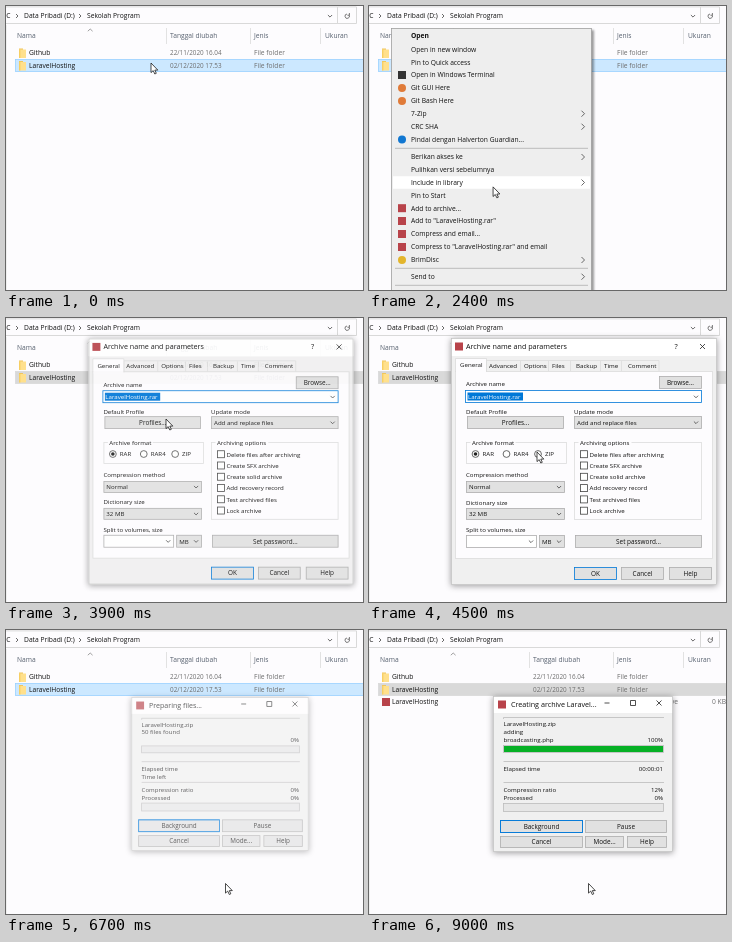
An HTML page for the animation above (9100 ms loop, 357 by 284 pixels).

```html
<!DOCTYPE html>
<html lang="id">
<head>
<meta charset="utf-8">
<title>Membuat arsip</title>
<style>
  html, body { margin: 0; width: 100%; height: 100%; overflow: hidden; background: #fdfcfe; }
  svg { display: block; width: 100%; height: 100%; font: 6.7px "Open Sans", "Noto Sans", sans-serif; }
  text { white-space: pre; }
  .win { filter: drop-shadow(0 1px 3px rgba(0, 0, 0, .38)); }
  .pop { filter: drop-shadow(2px 2px 1.2px rgba(0, 0, 0, .4)); }
  .dlg { font-size: 6.15px; }
</style>
</head>
<body>
<svg id="stage" viewBox="0 0 357 284" preserveAspectRatio="none"></svg>
<script>
const LOOP = 9100, STEP = 100;
const INK = '#111', GREY = '#6d6d6d', EDGE = '#adadad', BLUE = '#0078d7';
const RED = '#b8434a', PAGE = '#fdfcfe';

// Drawing helpers; text is placed by its vertical centre.
const text = (x, y, s, more = '') => `<text x="${x}" y="${y + 2.3}" fill="${INK}" ${more}>${s}</text>`;
const fill = (x, y, w, h, c, more = '') => `<rect x="${x}" y="${y}" width="${w}" height="${h}" fill="${c}" ${more}/>`;
const box = (x, y, x2, y2, c, edge = EDGE, more = '') =>
  `<rect x="${x + .5}" y="${y + .5}" width="${x2 - x - 1}" height="${y2 - y - 1}" fill="${c}" stroke="${edge}" stroke-width=".8" ${more}/>`;
const path = (d, c = '#444', w = .8, more = '') => `<path d="${d}" fill="none" stroke="${c}" stroke-width="${w}" ${more}/>`;
const dot = (x, y, r, c, more = '') => `<circle cx="${x}" cy="${y}" r="${r}" fill="${c}" ${more}/>`;
const square = (x, y, c) => fill(x - 4, y - 4, 8, 8, c);
const right = (x, y, size = 3) => path(`M${x - size / 2} ${y - size}l${size} ${size}l${-size} ${size}`);
const down = (x, y) => path(`M${x - 2.1} ${y - 1}l2.1 2.1l2.1 -2.1`);
const group = (id, body, more = '') => `<g id="${id}" ${more}>${body}</g>`;
const tint = c => `style="fill:${c}"`;
const MID = 'text-anchor="middle"', END = 'text-anchor="end"';
const button = (x, y, x2, y2, s, edge = EDGE) =>
  box(x, y, x2, y2, '#e1e1e1', edge) + text((x + x2) / 2, (y + y2) / 2, s, `${MID} font-size="6.4"`);
const combo = (x, y, x2, y2, s, c = '#e1e1e1', id = '') =>
  box(x, y, x2, y2, c) + text(x + 3, (y + y2) / 2, s, id && `id="${id}"`) + down(x2 - 6, (y + y2) / 2);
const cross = (x, y) => path(`M${x - 2.5} ${y - 2.5}l5 5m0 -5l-5 5`, '#222');

const folder = y => fill(13, y - 4.5, 4, 3, '#efc65c') + fill(13, y - 3.5, 7, 8.5, '#ffe08c') + fill(13, y - 3.5, 1.4, 8.5, '#f7cf63');

function explorer() {
  const date = (y, s) => text(164, y, s, `${tint(GREY)} font-size="6.35"`);
  const kind = y => text(248, y, 'File folder', tint(GREY));
  const heads = [[11, 'Nama'], [164, 'Tanggal diubah'], [248, 'Jenis'], [319, 'Ukuran']];
  return fill(0, 0, 357, 284, PAGE)
    + path('M0 .9H350.5V17.5H0M331.5 1V17.5', '#d9d9d9', 1)
    + text(4.5, 10, 'PC', END) + right(11, 10, 2) + text(18, 10, 'Data Pribadi (D:)')
    + right(74, 10, 2) + text(81, 10, 'Sekolah Program') + down(324, 10)
    + path('M343.2 9.2A2.2 2.2 0 1 1 341 8M343.4 7v2.2h-2', '#444', .7)
    + path('M.5 19V284', '#f0f0f0', 1)
    + path('M160.5 22V38M244.5 22V38M314.5 22V38', '#e2e2e2', 1)
    + path('M81.8 25.2l2.4 -2.2l2.4 2.2', '#777', .7)
    + heads.map(([x, s]) => text(x, 30, s, tint('#56606e'))).join('')
    + box(9, 53, 360, 66, '#cce8ff', '#99d1ff', 'id="row"')
    + folder(47) + text(23, 47, 'Github') + date(47, '22/11/2020 16.04') + kind(47)
    + folder(59.5) + text(23, 59.5, 'LaravelHosting') + date(59.5, '02/12/2020 17.53') + kind(59.5)
    + group('newRow', square(17, 72, RED) + text(23, 72, 'LaravelHosting')
      + text(309, 72, 'ZIP archive', `${END} ${tint(GREY)}`) + text(343, 72, '0 KB', tint(GREY)));
}

// Each entry: centre y, label, icon colour, icon kind ('o' circle, 's' square), submenu
const MENU = [
  [30, 'Open'], [43.5, 'Open in new window'], [56.3, 'Pin to Quick access'],
  [69, 'Open in Windows Terminal', '#333', 's'], [82, 'Git GUI Here', '#e07b39', 'o'],
  [95, 'Git Bash Here', '#e07b39', 'o'], [107.7, '7-Zip', '', '', 1], [120.7, 'CRC SHA', '', '', 1],
  [133.5, 'Pindai dengan Halverton Guardian...', '#1177d1', 'o'],
  [151, 'Berikan akses ke', '', '', 1], [163.7, 'Pulihkan versi sebelumnya'],
  [176.5, 'Include in library', '', '', 1], [189.3, 'Pin to Start'],
  [202.2, 'Add to archive...', RED, 's'], [215, 'Add to "LaravelHosting.rar"', RED, 's'],
  [228, 'Compress and email...', RED, 's'], [241, 'Compress to "LaravelHosting.rar" and email', RED, 's'],
  [254, 'BrimDisc', '#e3b52c', 'o', 1], [270.7, 'Send to', '', '', 1]
];

function entry([y, s, c, kind, more]) {
  const icon = kind === 's' ? square(33, y, c) : kind === 'o' ? dot(33, y, 4, c) : '';
  return icon + text(42, y, s, s === 'Open' ? 'font-weight="700"' : '') + (more ? right(214, y) : '');
}

const menu = () => box(22, 22, 223, 300, '#eee', '#a0a0a0')
  + fill(24, 0, 197, 12.6, '#fff', 'id="hover"')
  + path('M26 142.3H219M26 262.3H219M26 279.3H219', '#a6a6a6', .7)
  + MENU.map(entry).join('');

const frame = (x, y, x2, y2, bar, title, iconX, titleX) =>
  fill(x, y, x2 - x, y2 - y, '#f0f0f0') + fill(x, y, x2 - x, bar, '#fff')
  + box(x, y, x2, y2, 'none', '#c2c2c2')
  + square(iconX, y + 8.5, RED) + text(titleX, y + 8.5, title, 'class="title" font-size="7.2"');

function archiver() {
  const tabs = [[120, 'Advanced'], [155, 'Options'], [183, 'Files'], [207, 'Backup'], [235, 'Time'], [259, 'Comment']];
  const checks = ['Delete files after archiving', 'Create SFX archive', 'Create solid archive',
    'Add recovery record', 'Test archived files', 'Lock archive'];
  const radio = (x, s, id) => `<circle id="${id}" cx="${x}" cy="136" r="3.4" fill="#fff" stroke="#444" stroke-width=".8"/>`
    + text(x + 7, 136, s);
  const legend = (x, s, w) => fill(x - 1.5, 121, w, 6, PAGE) + text(x, 124.3, s);
  return frame(82, 20, 348, 267, 18, 'Archive name and parameters', 90, 97)
    + text(307, 28.5, '?', `${MID} font-size="7.5"`) + cross(333.5, 28.5)
    + box(86, 53, 344, 241, PAGE, '#dcdcdc')
    + path('M117.5 53V42.5H290V53M151.5 43V53M179.5 43V53M201.5 43V53M231.5 43V53M252.5 43V53', '#dcdcdc')
    + path('M86.5 54V40.5H117.5V54', '#dcdcdc') + fill(87, 41, 30, 14, PAGE)
    + text(91, 47, 'General') + tabs.map(([x, s]) => text(x, 47.5, s)).join('')
    + text(97, 66, 'Archive name') + button(290, 58, 333, 71, 'Browse...')
    + box(96, 72, 333, 85, '#fff', BLUE, 'id="field"') + fill(98.5, 74.5, 55.5, 8, BLUE, 'id="mark"')
    + text(99, 78.7, '', 'id="name"') + down(327, 78.7)
    + text(97, 94, 'Default Profile') + button(98, 98, 195, 111, 'Profiles...')
    + text(205, 94, 'Update mode') + combo(205, 98, 333, 111, 'Add and replace files')
    + box(97, 124, 198, 146, 'none', '#dcdcdc') + legend(103, 'Archive format', 45)
    + radio(106.5, 'RAR', 'rar') + radio(137.5, 'RAR4', 'rar4') + radio(169, 'ZIP', 'zip')
    + dot(106.5, 136, 1.8, '#222', 'id="pick"')
    + box(205, 124, 333, 202, 'none', '#dcdcdc') + legend(211, 'Archiving options', 53)
    + checks.map((s, i) => {
      const y = 136.2 + i * 11.3;
      return `<g class="${[2, 3, 5].includes(i) ? 'rarOnly' : ''}">${box(211, y - 4, 219, y + 4, '#fff', '#444')}${text(220.5, y, s)}</g>`;
    }).join('')
    + text(97, 157, 'Compression method') + combo(97, 163, 196, 175, 'Normal')
    + text(97, 184.3, 'Dictionary size') + combo(97, 190, 196, 202, '', '#e1e1e1', 'dict')
    + text(97, 212, 'Split to volumes, size') + combo(97, 217, 168, 230, '', '#fff') + combo(170, 217, 196, 230, 'MB')
    + button(206, 217, 333, 230, 'Set password...')
    + group('ok', button(205, 249, 248, 262, 'OK', BLUE))
    + button(252, 249, 295, 262, 'Cancel') + button(300, 249, 343, 262, 'Help');
}

function progress() {
  const value = (y, id, s = '') => text(294, y, s, `id="${id}" ${END}`);
  return frame(124, 66, 304, 222, 17, '', 133, 142)
    + path('M235.5 73h5M261.5 70.5h5v5h-5z', '#222') + cross(290, 73)
    + path('M134.5 89V87.5H295M134.5 131.5H295M134.5 152.5H295', '#b5b5b5', .7)
    + text(134.5, 93.7, 'LaravelHosting.zip') + text(134.5, 101.3, '', 'id="action"')
    + text(134.5, 109.3, '', 'id="file"') + value(109.3, 'percent')
    + box(134, 115, 295, 123, '#e6e6e6', '#bcbcbc') + fill(135, 116, 0, 6, '#06b025', 'id="bar"')
    + text(134.5, 139, 'Elapsed time') + value(139, 'elapsed') + text(134.5, 147, 'Time left', 'id="left"')
    + text(134.5, 159.7, 'Compression ratio') + value(159.7, 'ratio')
    + text(134.5, 168, 'Processed') + value(168, 'done', '0%')
    + box(134, 173, 295, 182, '#e6e6e6', '#bcbcbc')
    + button(131, 190, 214, 203, 'Background', BLUE) + box(131, 190, 214, 203, 'none', BLUE)
    + button(216, 190, 298, 203, 'Pause') + button(131, 206, 214, 218, 'Cancel')
    + button(216, 206, 255, 218, 'Mode...') + button(258, 206, 298, 218, 'Help');
}

const stage = document.getElementById('stage');
stage.innerHTML = explorer()
  + group('menu', menu(), 'class="pop"')
  + group('ghost', entry(MENU[13]))
  + group('archiver', archiver(), 'class="win dlg"')
  + group('progress', progress(), 'class="win dlg"')
  + group('cursor', '<path d="M0 0V9.6L2.2 7.6L3.8 11L5.3 10.3L3.8 7.1H6.8Z" fill="#fff" stroke="#111" stroke-width=".75"/>'
    + group('busy', dot(8, 0, 3.6, '#d9f0ff', 'stroke="#1a83d8" stroke-width="2.4"')));

const $ = id => document.getElementById(id);
const set = (id, key, v) => $(id).setAttribute(key, v);
const show = (id, v) => { $(id).style.display = v > 0 ? '' : 'none'; $(id).style.opacity = v; };
const write = (id, s) => { $(id).textContent = s; };

// Tables of [time, value...], eased between rows.
const MOVES = [[0, 145, 57], [600, 223, 55], [1500, 223, 55], [1900, 200, 92], [2500, 118, 188], [2900, 98, 202],
  [3600, 98, 202], [3900, 160, 101], [4100, 160, 101], [4500, 168, 134], [5000, 168, 134], [5300, 187, 161],
  [6000, 226, 253], [6300, 226, 253], [6600, 219.5, 253.5], [9100, 219.5, 253.5]];
const MENU_FADE = [[900, 0], [1000, .2], [1400, 1], [3100, 1], [3200, 0]];
const GHOST_FADE = [[3100, 0], [3200, .7], [3500, 0]];
const ARCHIVER_FADE = [[3400, 0], [3500, .35], [3600, .35], [3700, .75], [4000, 1], [6400, 1], [6700, 0]];
const PROGRESS_FADE = [[6600, 0], [6700, .65], [6900, 1]];
const FILES = ['Kernel.php', 'Handler.php', 'Controller.php', 'Authenticate.php', 'TrustProxies.php',
  'User.php', 'artisan', 'composer.json', 'app.php', 'auth.php', 'broadcasting.php'];

function at(rows, t, ease = u => u) {
  const i = rows.findIndex(r => r[0] > t);
  if (i === 0) return rows[0].slice(1);
  if (i < 0) return rows[rows.length - 1].slice(1);
  const a = rows[i - 1], b = rows[i], u = ease((t - a[0]) / (b[0] - a[0]));
  return a.slice(1).map((v, k) => v + (b[k + 1] - v) * u);
}
const smooth = u => u * u * (3 - 2 * u);

// Windows grow slightly about their centre while they fade.
function fadeWindow(id, rows, t, x, y) {
  const shown = at(rows, t)[0];
  show(id, shown);
  set(id, 'transform', `translate(${x} ${y}) scale(${.96 + .04 * shown}) translate(${-x} ${-y})`);
}

function draw(t) {
  const [x, y] = at(MOVES, t, smooth);
  set('cursor', 'transform', `translate(${x} ${y})`);
  show('busy', t >= 3200 && t < 3700 ? 1 : 0);

  const idle = t >= 3700 && t < 6700 || t >= 6800;
  set('row', 'fill', idle ? '#d9d9d9' : '#cce8ff');
  set('row', 'stroke', idle ? '#d9d9d9' : '#99d1ff');
  show('newRow', t >= 7000 ? 1 : 0);

  show('menu', at(MENU_FADE, t)[0]);
  const over = x < 221 && t >= 1600 && MENU.find(m => Math.abs(m[0] - y) < 6.5);
  show('hover', over ? 1 : 0);
  if (over) set('hover', 'y', over[0] - 6.3);
  show('ghost', at(GHOST_FADE, t)[0]);

  const zip = t >= 4600;
  fadeWindow('archiver', ARCHIVER_FADE, t, 215, 143.5);
  show('mark', zip ? 0 : 1);
  set('field', 'stroke', zip ? EDGE : BLUE);
  write('name', 'LaravelHosting.' + (zip ? 'zip' : 'rar'));
  $('name').style.fill = zip ? INK : '#fff';
  write('dict', zip ? '32 KB' : '32 MB');
  set('pick', 'cx', zip ? 169 : 106.5);
  set('pick', 'fill', zip ? BLUE : '#222');
  set('zip', 'stroke', zip ? BLUE : '#444');
  for (const g of document.querySelectorAll('.rarOnly')) g.style.opacity = zip ? .4 : 1;
  set('ok', 'style', t >= 6200 && t < 6400 ? 'filter:brightness(.92)' : '');

  fadeWindow('progress', PROGRESS_FADE, t, 214, 144);
  const run = t >= 6900, n = Math.max(0, Math.min(FILES.length - 1, Math.floor((t - 6900) / 200)));
  $('progress').querySelector('.title').textContent = run ? 'Creating archive Laravel...' : 'Preparing files...';
  write('action', run ? 'adding' : '50 files found');
  write('file', run ? FILES[n] : '');
  write('percent', run ? '100%' : '0%');
  set('bar', 'width', run ? 159 : 0);
  write('elapsed', run ? (t >= 7900 ? '00:00:01' : '00:00:00') : '');
  show('left', run ? 0 : 1);
  write('ratio', (run ? Math.round(30 - 1.8 * n) : 0) + '%');
}

let last = -1;
function tick(now) {
  const t = Math.floor((now % LOOP) / STEP) * STEP;
  if (t !== last) draw(last = t);
  requestAnimationFrame(tick);
}
draw(0);
requestAnimationFrame(tick);
</script>
</body>
</html>
```
